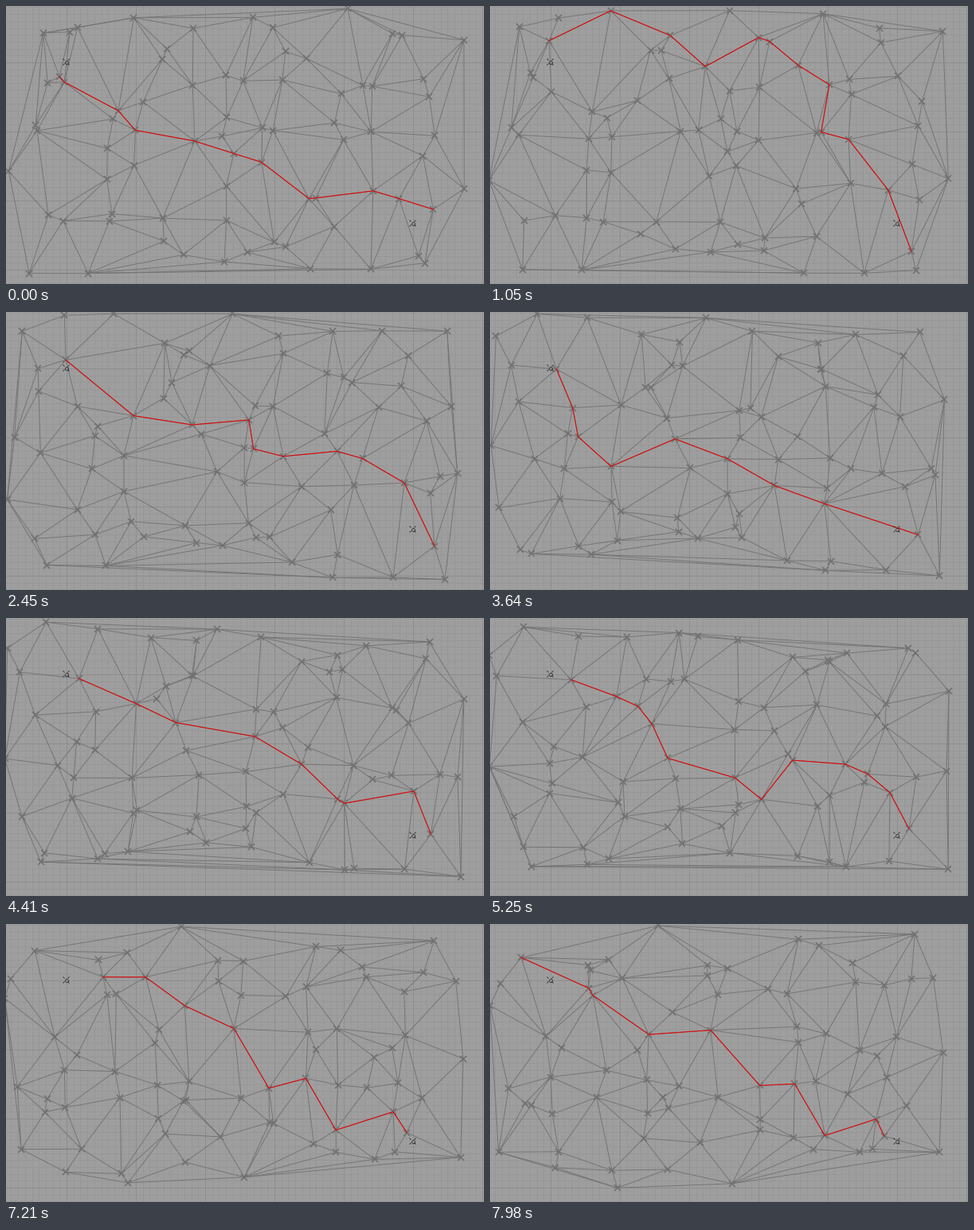
Animation of 600x350 px, one loop 8000 ms. Source, as a matplotlib script:

```python
import numpy as np
import matplotlib.pyplot as plt
from matplotlib.animation import FuncAnimation
from matplotlib.collections import LineCollection
from matplotlib.tri import Triangulation

W, H, DPI = 600, 350, 100
STEPS, LOOP = 115, 8000
PITCH, RADIUS = 74.8, 27
LEFT, BOTTOM = 25.4, 309.8
TURN = 2 * np.pi / 200          # angle per step
PX = 72 / DPI                   # one pixel in points
START, GOAL = np.array([75.5, 70.5]), np.array([510.5, 273.5])

# Starting angle of each orbit in degrees, row by row from the bottom
PHASES = [
    [82, 84, -31, 27, -14, 129, 127, 149],
    [-111, -100, 68, 54, 160, 203, 77],
    [71, 107, 125, 113, -7, -27, 24],
    [215, -11, -122, 7, -98, 135, 45, 14],
    [-60, -2, -118, -37, -96, -26, -126, 162],
    [199, -83, 25, 93, 184, 205, 10],
    [-81, 97, -36, 112, -124, -32, -62],
    [6, 176, 96, -14, 179, 38, 167, 131],
    [-38, -138, 38, -123, 14, 145, -31, -17],
    [-4, -32, 112, -33, 184, -107, 168],
]


def honeycomb():
    rise = PITCH * np.sqrt(3) / 2
    centres = []
    for r, row in enumerate(PHASES):
        x0 = LEFT if len(row) == 8 else LEFT + PITCH / 2
        y = BOTTOM - rise * (r // 2) - rise / 3 * (r % 2)
        centres += [(x0 + PITCH * k, y) for k in range(len(row))]
    return np.array(centres)


CENTRES = honeycomb()
ANGLES = np.radians(np.concatenate(PHASES))


def nodes_at(step):
    a = ANGLES - TURN * step
    return CENTRES + RADIUS * np.column_stack([np.cos(a), np.sin(a)])


def nearest(pts, p):
    return int(np.argmin(np.hypot(*(pts - p).T)))


def find_path(pts, edges):
    """Spread distances from the start, then descend them from the goal."""
    a, b = np.vstack([edges, edges[:, ::-1]]).T
    length = np.hypot(*(pts[a] - pts[b]).T)
    first, node = nearest(pts, START), nearest(pts, GOAL)
    dist = np.full(len(pts), np.inf)
    dist[first] = 0
    while True:
        new = dist.copy()
        np.minimum.at(new, b, dist[a] + length)
        if np.array_equal(new, dist):
            break
        dist = new
    path = [node]
    while node != first:
        near = b[a == node]
        node = near[np.argmin(dist[near])]
        path.append(node)
    return pts[path]


fig = plt.figure(figsize=(W / DPI, H / DPI), dpi=DPI, facecolor="#9e9e9e")
ax = fig.add_axes([0, 0, 1, 1])
ax.set_xlim(0, W)
ax.set_ylim(H, 0)
ax.axis("off")


def add_lines(segs, color, width, z):
    lines = LineCollection(segs, colors=color, linewidths=width * PX, zorder=z)
    ax.add_collection(lines)
    return lines


def grid(step, color, z):
    xs = np.floor(np.arange(START[0] % step, W, step)) + 0.5
    ys = np.floor(np.arange(START[1] % step, H, step)) + 0.5
    segs = [[(x, 0), (x, H)] for x in xs] + [[(0, y), (W, y)] for y in ys]
    add_lines(segs, color, 1, z)


grid(8.7, "#979797", 0)
grid(87, "#8d8d8d", 1)

mesh = add_lines([], "#747474", 0.95, 2)
crosses, = ax.plot([], [], "x", color="#707070", ms=7.5 * PX, mew=1.6 * PX, zorder=3)
route, = ax.plot([], [], color="#e60000", lw=1.05 * PX, zorder=4)

for x, y in (START, GOAL):
    ax.plot(x, y, "o", mfc="none", mec="#202020", ms=4 * PX, mew=0.7 * PX, zorder=5)
    rays = [[(x + 2 * i, y + 2 * j), (x + 4 * i, y + 4 * j)]
            for i in (-1, 1) for j in (-1, 1)]
    add_lines(rays, "#202020", 0.8, 5)


def update(step):
    pts = nodes_at(step)
    edges = Triangulation(*pts.T).edges
    mesh.set_segments(pts[edges])
    crosses.set_data(*pts.T)
    route.set_data(*find_path(pts, edges).T)
    return mesh, crosses, route


anim = FuncAnimation(fig, update, frames=STEPS, interval=LOOP / STEPS,
                     repeat=True, repeat_delay=0)
plt.show()
```
